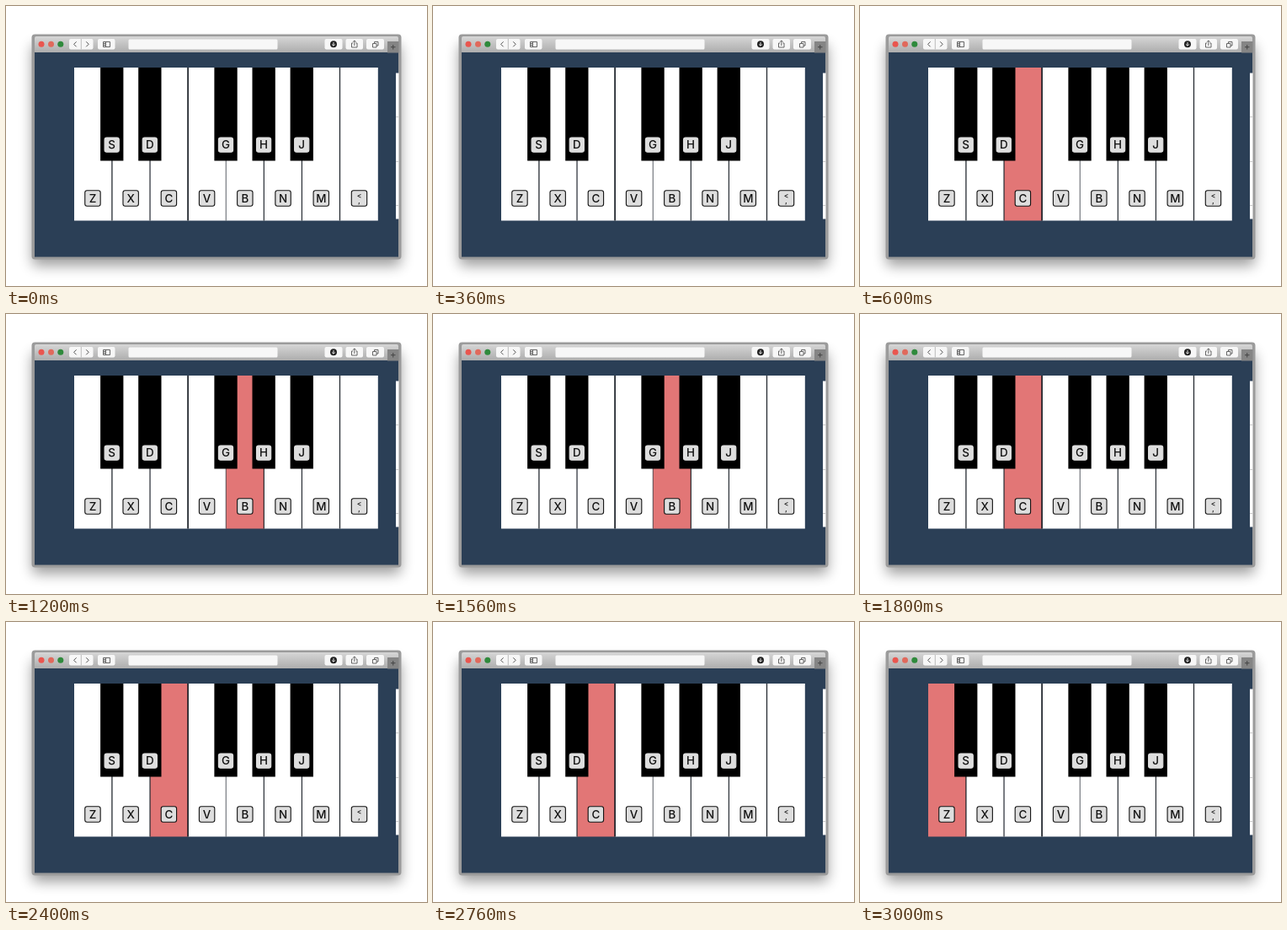
These frames come from a looping animation (500 by 332 pixels, 3600 ms). An HTML page:

```html
<!DOCTYPE html>
<html lang="en">
<head>
<meta charset="utf-8">
<title>Keyboard piano</title>
<style>
  html, body { margin: 0; width: 100%; height: 100%; overflow: hidden; background: #fff; }
  svg { display: block; width: 100vw; height: 100vh; }
  text { font-family: Inter, Lato, sans-serif; font-weight: 500; font-size: 13.4px; text-anchor: middle; fill: #111; }
</style>
</head>
<body>
<svg viewBox="0 0 500 332">
  <defs>
    <linearGradient id="bar" x1="0" y1="0" x2="0" y2="1">
      <stop offset="0" stop-color="#d6d6d6"/>
      <stop offset="1" stop-color="#acacac"/>
    </linearGradient>
    <filter id="blur" x="-20%" y="-20%" width="140%" height="150%">
      <feGaussianBlur stdDeviation="8"/>
    </filter>
  </defs>

  <rect x="31" y="46" width="438" height="262" rx="5" fill="#000" opacity=".38" filter="url(#blur)"/>
  <rect x="30.5" y="33.5" width="439" height="267" rx="4" fill="#9b9b9b"/>
  <rect x="34" y="36" width="432" height="19.5" rx="2" fill="url(#bar)"/>
  <rect x="34" y="55" width="432" height="242.5" fill="#2b3f56"/>

  <g id="chrome">
    <circle cx="42" cy="45.3" r="3.5" fill="#e9564f"/>
    <circle cx="53.5" cy="45.3" r="3.5" fill="#e0695c"/>
    <circle cx="64.8" cy="45.3" r="3.5" fill="#2f8a3c"/>
    <g fill="#f7f7f7">
      <rect x="75" y="39" width="28.5" height="12.5" rx="2"/>
      <rect x="109" y="39" width="20.5" height="12.5" rx="2"/>
      <rect x="145.5" y="39.5" width="177" height="12" rx="1.5"/>
      <rect x="378.5" y="39" width="21" height="12.5" rx="2"/>
      <rect x="403.5" y="39" width="20.5" height="12.5" rx="2"/>
      <rect x="428" y="39" width="21" height="12.5" rx="2"/>
    </g>
    <path d="M89.3 39v12.5" stroke="#bbb"/>
    <g fill="none" stroke="#555">
      <path d="M83.6 42.3l-3 3 3 3M95.2 42.3l3 3-3 3"/>
      <path d="M115.5 42.5h8v6h-8zM118.5 42.5v6M116 44.5h2M116 46.5h2" stroke-width=".9"/>
      <path d="M412 44h-1.5v5h6.500v-5h-1.500M413.800 47v-6M412 42.700l1.800-1.800 1.800 1.800" stroke-width=".9"/>
      <path d="M435.500 44.500h4.500v4.500h-4.500zM437.500 44.500v-2h4.500v4.500h-2" stroke-width=".9"/>
    </g>
    <circle cx="389" cy="45.300" r="4" fill="#222"/>
    <path d="M389 43v4M387.200 45.500l1.800 1.800 1.800-1.800" fill="none" stroke="#fff" stroke-width=".9"/>
    <rect x="453" y="42" width="13.500" height="13.500" fill="#858585"/>
    <path d="M457 48.700h5.500M459.750 46v5.500" stroke="#444"/>
  </g>

  <rect x="463" y="79.500" width="3.500" height="173" fill="#fff"/>
  <path d="M463 131.500h3.500M463 184.500h3.500M463 236.500h3.500" stroke="#ccc"/>
  <g id="piano"></g>
</svg>
<script>
const NS = 'http://www.w3.org/2000/svg';
const LEFT = 81, TOP = 73, WIDTH = 45.1, HEIGHT = 181.5;
const STEP = 600;
const MELODY = ['', 'C', 'B', 'C', 'C', 'Z'];
const piano = document.getElementById('piano');
const keys = {};

function add(tag, attrs, label) {
  const el = document.createElementNS(NS, tag);
  for (const name in attrs) el.setAttribute(name, attrs[name]);
  if (label) el.textContent = label;
  piano.appendChild(el);
  return el;
}

function cap(x, y, size, edge) {
  add('rect', { x: x - size / 2, y: y - size / 2, width: size, height: size,
    rx: 2.5, fill: '#dedede', stroke: edge, 'stroke-width': 1.1 });
}

const white = [...'ZXCVBNM<'];
white.forEach((name, i) => {
  keys[name] = add('rect', { x: LEFT + i * WIDTH, y: TOP, width: WIDTH, height: HEIGHT });
});

// Dividers between the white keys, with slightly uneven weights
[1.2, 1.1, 1.7, 0.6, 1.1, 1.1, 1.2].forEach((w, i) => {
  const x = LEFT + (i + 1) * WIDTH - 0.2;
  add('path', { d: `M${x} ${TOP}v${HEIGHT}`, stroke: '#1b2027', 'stroke-width': w });
});

white.forEach((name, i) => {
  const x = LEFT + (i + 0.5) * WIDTH - 0.6 + i * 0.12;
  cap(x, 228, 18.4, '#111');
  if (name === '<') {
    add('text', { x, y: 227.5, style: 'font-size:8.5px' }, '<');
    add('text', { x, y: 233.5, style: 'font-size:9px' }, ',');
  } else {
    add('text', { x, y: 232.9 }, name);
  }
});

[['S', 1], ['D', 2], ['G', 4], ['H', 5], ['J', 6]].forEach(([name, slot]) => {
  const x = LEFT + slot * WIDTH - 0.2;
  add('rect', { x: x - 13.8, y: TOP, width: 27.3, height: 110.5, fill: '#000' });
  cap(x - 0.2, 164.6, 17.2, '#dedede');
  add('text', { x: x - 0.2, y: 169.4 }, name);
});

function draw(time) {
  const played = MELODY[Math.floor(time / STEP) % MELODY.length];
  for (const name of white) keys[name].setAttribute('fill', name === played ? '#e27676' : '#fff');
}

const start = performance.now();
function tick() {
  draw(performance.now() - start);
  requestAnimationFrame(tick);
}
tick();
</script>
</body>
</html>
```
